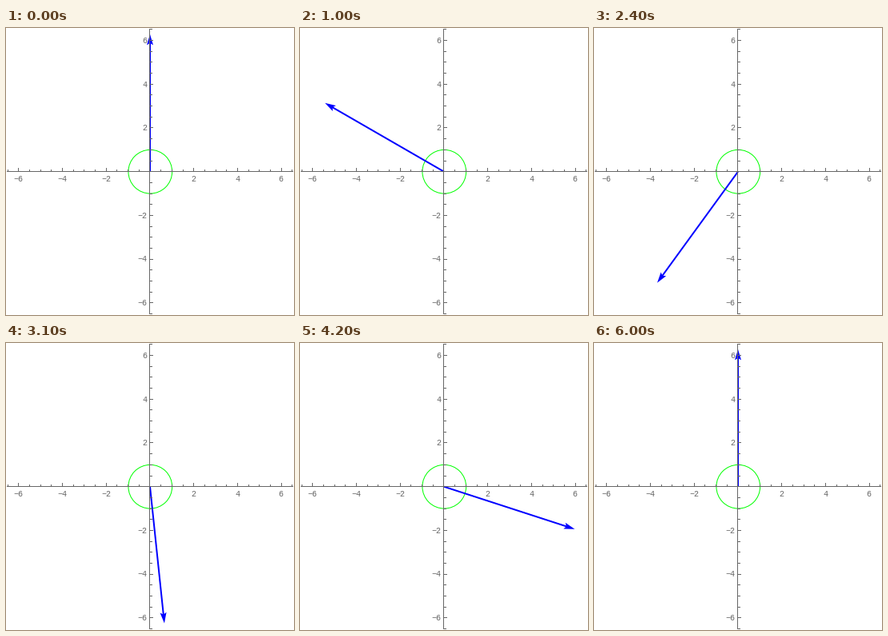
Recreate the animation shown at these times as a matplotlib script. Size 360 by 359 pixels, loop 6.1 s.

```python
import math

import matplotlib.pyplot as plt
from matplotlib.animation import FuncAnimation
from matplotlib.patches import Circle, Polygon, Rectangle

W, H = 360, 359
DPI = 100
PX = 72 / DPI            # one pixel in points
UNIT = 27.35             # pixels per axis unit
AXIS = 179               # pixel row and column of the axes
OX, OY = 180, 179.7
LENGTH = 2 * math.pi * UNIT
STEPS = 60
HEAD, HALF, NOTCH = 13.5, 4.0, 11.0

GREY = "#666666"
BLUE = "#0000ff"
GREEN = "#00ff00"

fig = plt.figure(figsize=(W / 100, H / 100), dpi=DPI, facecolor="white")
ax = fig.add_axes([0, 0, 1, 1])
ax.set_xlim(0, W)
ax.set_ylim(H, 0)
ax.axis("off")


def bar(x, y, w, h):
    ax.add_patch(Rectangle((x, y), w, h, fc=GREY, lw=0,
                           antialiased=False, zorder=4))


def label(x, y, value, align):
    text = str(value).replace("-", "\u2212")
    ax.text(x, y, text, ha=align, va="baseline", color=GREY,
            family="Liberation Mono", fontsize=10 * PX, zorder=5)


def draw_axes():
    bar(1, AXIS, 358, 1)
    bar(AXIS, 1, 1, 357)
    for k in range(-13, 14):
        if k == 0:
            continue
        value = k / 2
        major = k % 4 == 0
        up, right = (4, 4) if major else (2, 3)
        x = OX + UNIT * value
        y = OY - UNIT * value
        bar(math.floor(x), AXIS - up, 1, up)
        bar(AXIS + 1, math.floor(y), right, 1)
        if major:
            label(x - 0.4, 192, int(value), "center")
            label(176.3, y + 3.4, int(value), "right")


draw_axes()
ax.add_patch(Circle((OX + 0.3, OY), UNIT, fill=False, ec=GREEN, lw=PX,
                    zorder=2))
shaft, = ax.plot([], [], color=BLUE, lw=2 * PX, solid_capstyle="butt",
                 zorder=3)
head = Polygon([(OX, OY)] * 4, closed=True, fc=BLUE, lw=0, zorder=3)
ax.add_patch(head)


def place(along, across, angle):
    """Map arrow coordinates to pixels; the angle runs from straight up."""
    c, s = math.cos(angle), math.sin(angle)
    return OX - along * s + across * c, OY - along * c - across * s


def update(i):
    angle = 2 * math.pi * i / STEPS
    end = place(LENGTH - NOTCH + 0.5, 0, angle)
    shaft.set_data([OX, end[0]], [OY, end[1]])
    corners = [(LENGTH, 0), (LENGTH - HEAD, HALF),
               (LENGTH - NOTCH, 0), (LENGTH - HEAD, -HALF)]
    head.set_xy([place(a, b, angle) for a, b in corners])
    return shaft, head


anim = FuncAnimation(fig, update, frames=STEPS + 1, interval=100,
                     repeat=True, repeat_delay=0, blit=False)
plt.show()
```
